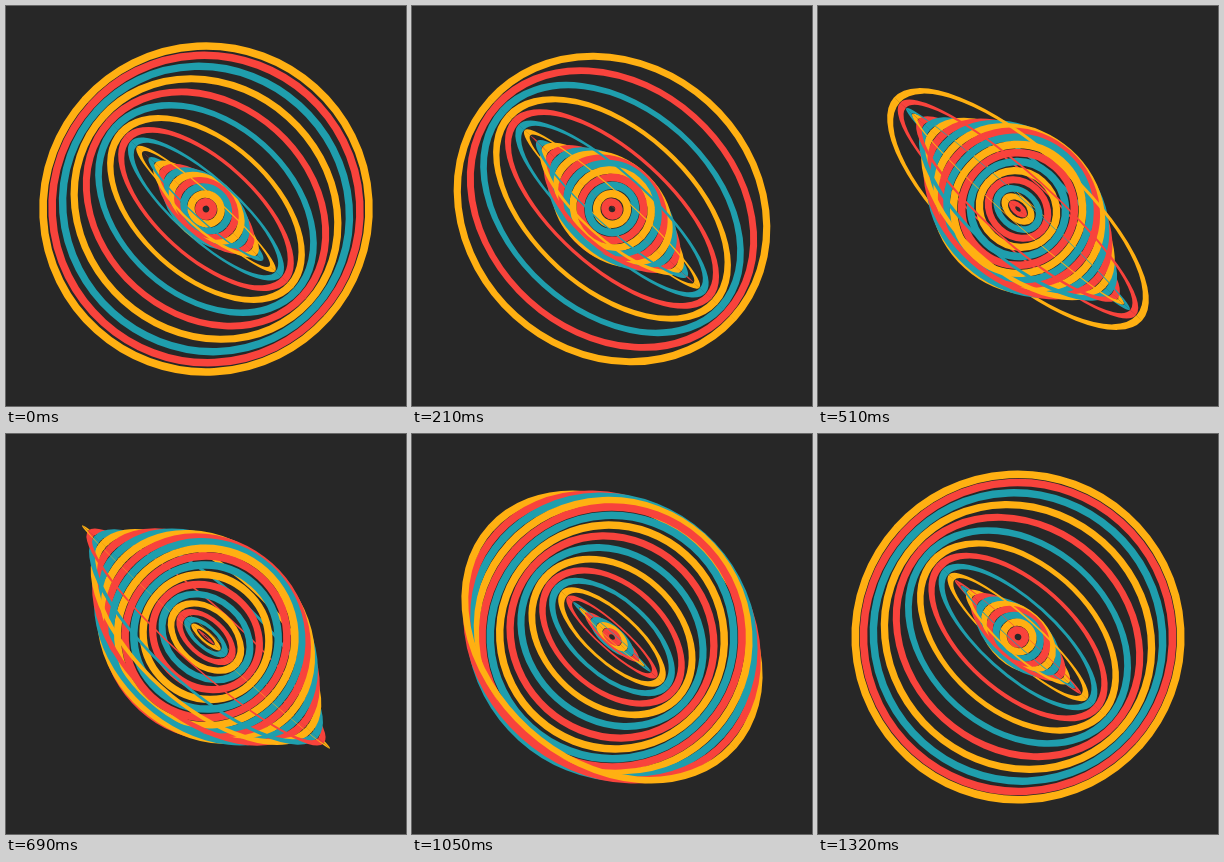
Write an HTML page with a canvas that moves like this. It is 400 by 400 pixels and loops after 1350 ms.

```html
<!DOCTYPE html>
<html lang="en">
<head>
<meta charset="utf-8">
<title>Turning rings</title>
<style>
html, body { margin: 0; height: 100%; overflow: hidden; background: #272727; }
canvas { display: block; width: 400px; height: 400px; }
</style>
</head>
<body>
<canvas id="stage" width="400" height="400"></canvas>
<script>
const ctx = document.getElementById('stage').getContext('2d');
const LOOP = 1350, STEP = 30;
const COUNT = 20, OUTER = 163, SPACING = 8.2, WIDTH = 7.6;
const AXIS = 42 * Math.PI / 180;
const COLORS = ['#ffb012', '#f8433c', '#1f9ead'];

// Each ring turns about the shared diagonal axis, one phase step ahead of the ring around it.
function halfRings(turn) {
  const halves = [];
  for (let i = 0; i < COUNT; i++) {
    const angle = Math.PI * (turn + i / COUNT);
    for (const a of [angle, angle + Math.PI]) {
      halves.push({ radius: OUTER - i * SPACING, color: COLORS[i % 3], open: Math.cos(a), depth: Math.sin(a) });
    }
  }
  // All halves meet on the axis, so one sort from back to front is exact.
  return halves.sort((a, b) => a.depth - b.depth);
}

function drawHalf({ radius, color, open }) {
  const overlap = 0.3 / radius;
  ctx.save();
  ctx.translate(200, 203);
  ctx.rotate(AXIS);
  ctx.scale(1, open);
  ctx.beginPath();
  ctx.arc(0, 0, radius, Math.PI - overlap, 2 * Math.PI + overlap);
  ctx.strokeStyle = color;
  ctx.lineWidth = WIDTH;
  ctx.stroke();
  ctx.restore();
}

function frame() {
  const time = Math.floor((performance.now() + 1) / STEP) * STEP % LOOP;
  ctx.fillStyle = '#272727';
  ctx.fillRect(0, 0, 400, 400);
  halfRings(time / LOOP).forEach(drawHalf);
  requestAnimationFrame(frame);
}
frame();
</script>
</body>
</html>
```
